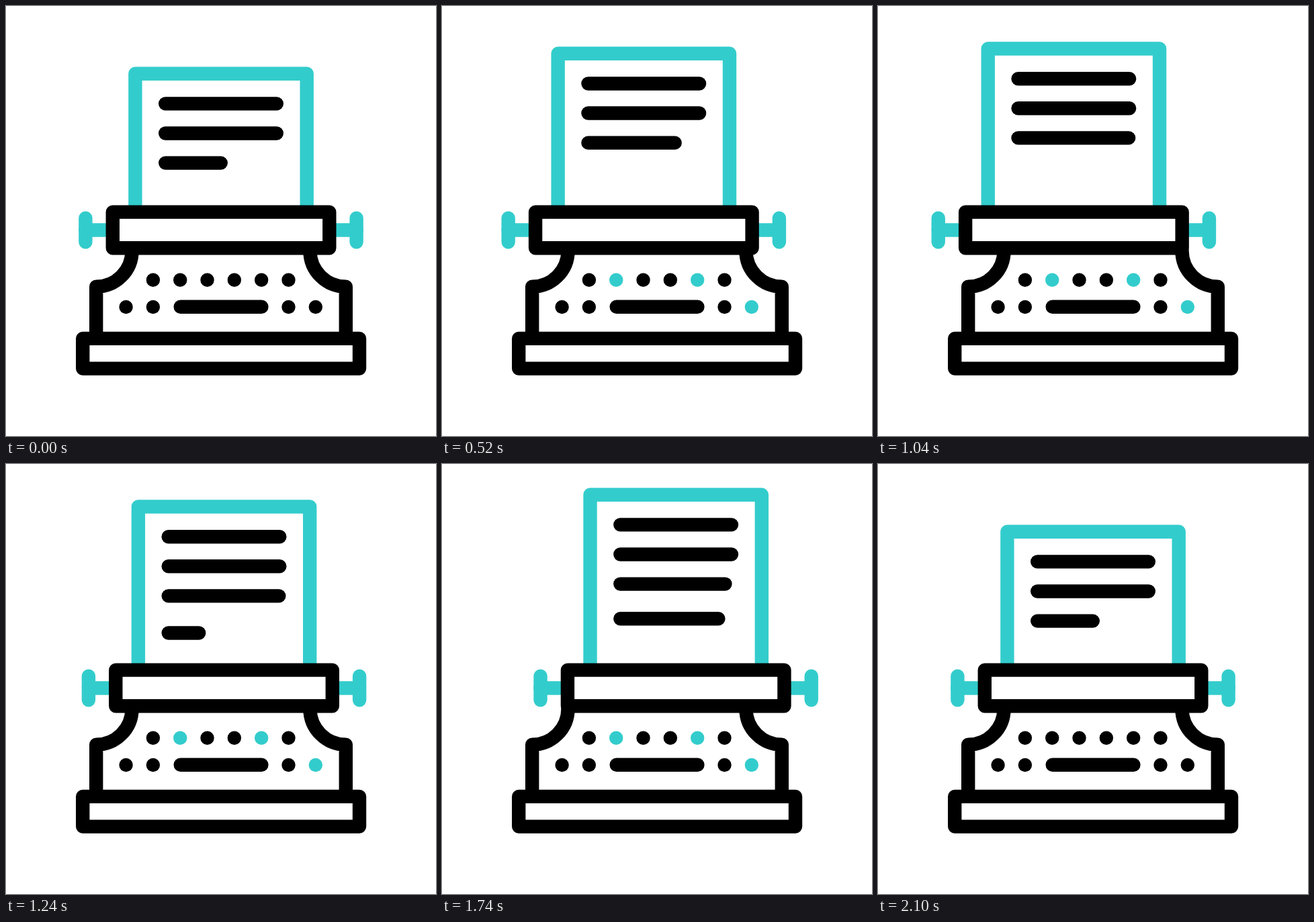
Animation of 640 by 640 pixels, one loop 2.4 s. Source, as an HTML page with a canvas:

```html
<!DOCTYPE html>
<html lang="en">
<head>
<meta charset="utf-8">
<title>Typewriter</title>
<style>
html, body { margin: 0; width: 100%; height: 100%; overflow: hidden; background: #fff; }
canvas { display: block; width: 100%; height: 100%; }
</style>
</head>
<body>
<canvas id="stage" width="640" height="640"></canvas>
<script>
const ctx = document.getElementById('stage').getContext('2d');
const INK = '#000', TEAL = '#33cccc', PAPER = '#fff';
const LOOP = 2400, STEP = 20, WEIGHT = 20.4;

// Keyframes as [ms, value]
const tracks = {
  shift: [[20, 0], [260, -7.25], [560, -22], [760, -36], [800, -36.4],
          [1100, -25], [1240, 4.5], [1500, 28], [1640, 31.4]],
  lift: [[280, 0], [560, -34], [620, -37.2], [1250, -37.2], [1500, -49.5], [1640, -61.4]],
  third: [[280, 82.6], [720, 164.6]],
  fourth: [[1060, 0], [1240, 45.5], [1500, 155], [1640, 163]],
  fourthY: [[1060, 270], [1240, 251.5], [1500, 234.5], [1640, 217.5]]
};
const rest = { shift: 0, lift: 0, third: 82.6, fourth: 0, fourthY: 340 };

function slope(keys, i) {
  if (i <= 0 || i >= keys.length - 1) return 0;
  const rate = k => (keys[k + 1][1] - keys[k][1]) / (keys[k + 1][0] - keys[k][0]);
  const a = rate(i - 1), b = rate(i);
  return a * b <= 0 ? 0 : 2 * a * b / (a + b);
}

// Monotone cubic through the keyframes
function sample(keys, t) {
  const last = keys.length - 1;
  if (t <= keys[0][0]) return keys[0][1];
  if (t >= keys[last][0]) return keys[last][1];
  let i = 0;
  while (keys[i + 1][0] <= t) i++;
  const [t0, v0] = keys[i], [t1, v1] = keys[i + 1];
  const d = t1 - t0, u = (t - t0) / d, w = 1 - u;
  return v0 * w * w * (1 + 2 * u) + v1 * u * u * (3 - 2 * u) +
    d * u * w * (slope(keys, i) * w - slope(keys, i + 1) * u);
}

function smooth(u) {
  u = Math.min(1, Math.max(0, u));
  return u * u * (3 - 2 * u);
}

function pose(t) {
  const back = smooth((t - 1650) / 450);
  const p = {};
  for (const name in tracks) {
    const v = sample(tracks[name], t);
    p[name] = v + (rest[name] - v) * back;
  }
  return p;
}

function line(color, ...pts) {
  ctx.strokeStyle = color;
  ctx.beginPath();
  pts.forEach(([x, y]) => ctx.lineTo(x, y));
  ctx.stroke();
}

function box(x0, y0, x1, y1, color) {
  ctx.fillStyle = PAPER;
  ctx.strokeStyle = color;
  ctx.beginPath();
  ctx.rect(x0, y0, x1 - x0, y1 - y0);
  ctx.fill();
  ctx.stroke();
}

function key(x, y, lit) {
  ctx.fillStyle = lit ? TEAL : INK;
  ctx.beginPath();
  ctx.arc(x, y, 10.2, 0, Math.PI * 2);
  ctx.fill();
}

function drawBody(t) {
  for (const side of [-1, 1]) {
    ctx.save();
    ctx.translate(320, 0);
    ctx.scale(side, 1);
    ctx.strokeStyle = INK;
    ctx.beginPath();
    ctx.arc(185.8, 364.4, 53.3, Math.PI, Math.PI / 2, true);
    ctx.lineTo(185.8, 495);
    ctx.stroke();
    ctx.restore();
  }
  box(114.2, 494.9, 526, 539.6, INK);

  const first = t >= 100 && t < 500;
  const second = t >= 500 && t < 2080;
  for (let i = 0; i < 6; i++) {
    const lit = first && (i === 0 || i === 2) || second && (i === 1 || i === 4);
    key(218.9 + i * 40.32, 407.7, lit);
  }
  key(178.6, 448, false);
  key(218.9, 448, first);
  key(420.5, 448, false);
  key(460.8, 448, second);
  line(INK, [259.7, 447.8], [380.4, 447.8]);
}

function drawCarriage(p) {
  ctx.save();
  ctx.translate(p.shift, 0);
  const y = p.lift;
  line(TEAL, [192.4, 310], [192.4, 100.7 + y], [447.7, 100.7 + y], [447.7, 310]);
  const text = (ly, len) => line(INK, [237.2, ly], [237.2 + len, ly]);
  text(145.4 + y, 165.6);
  text(189.5 + y, 165.6);
  text(233.6 + y, p.third);
  if (p.fourth > 0.5) text(p.fourthY, p.fourth);

  line(TEAL, [118.4, 333.5], [521.6, 333.5]);
  for (const x of [118.4, 521.6]) line(TEAL, [x, 315.7], [x, 351.3]);
  box(158.8, 306.6, 481.3, 360.3, INK);
  ctx.restore();
}

function frame(now) {
  const t = Math.floor(now % LOOP / STEP) * STEP;
  ctx.fillStyle = PAPER;
  ctx.fillRect(0, 0, 640, 640);
  ctx.lineWidth = WEIGHT;
  ctx.lineCap = ctx.lineJoin = 'round';
  drawCarriage(pose(t));
  drawBody(t);
}

let start;
function tick(now) {
  if (start === undefined) start = now;
  frame(now - start);
  requestAnimationFrame(tick);
}
frame(0);
requestAnimationFrame(tick);
</script>
</body>
</html>
```
